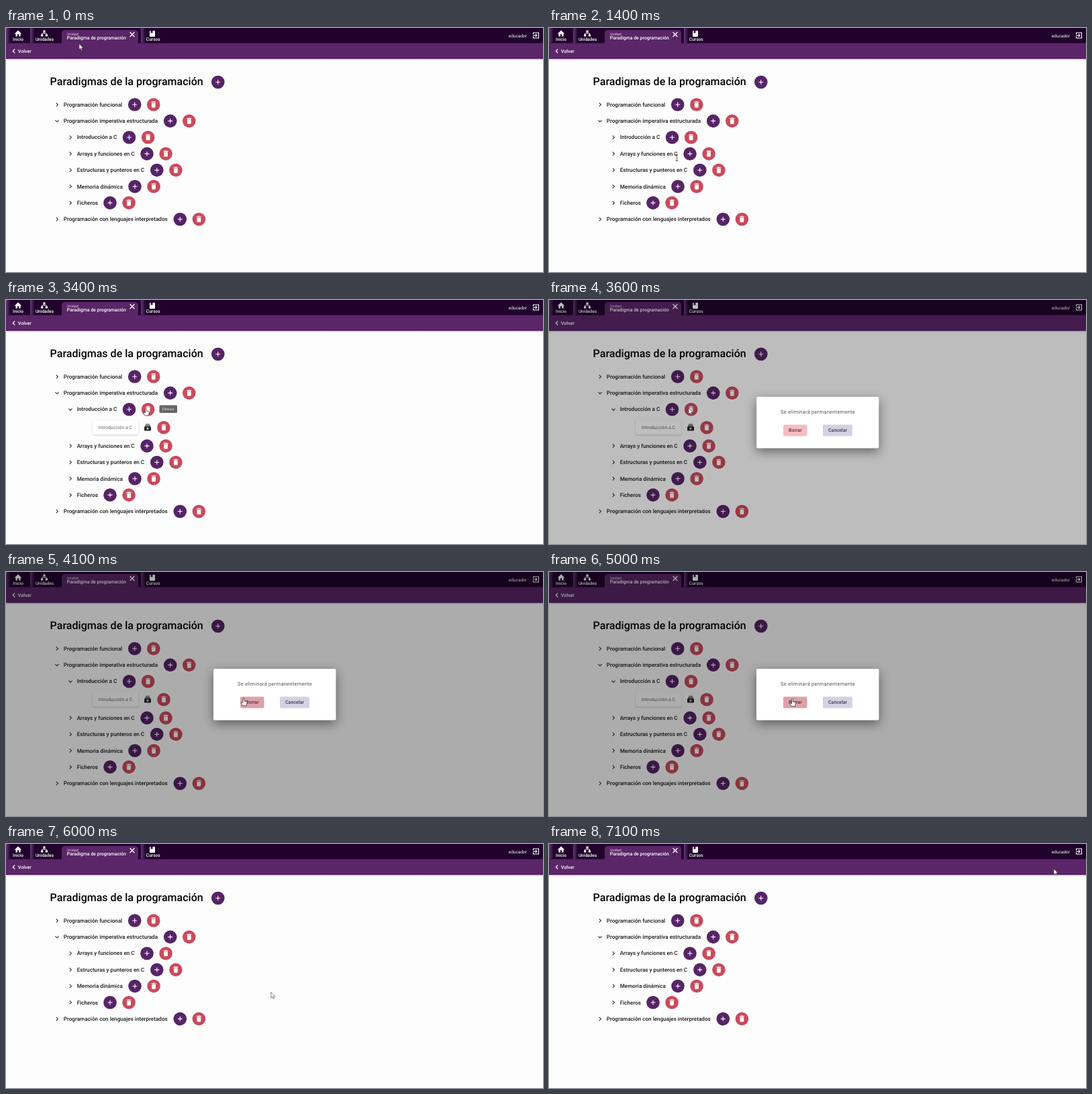
An HTML page that plays this animation: 800x363 px, repeating every 7.6 s.

```html
<!DOCTYPE html>
<html lang="es">
<head>
<meta charset="utf-8">
<title>Unidad</title>
<style>
  html, body { margin: 0; width: 100%; height: 100%; overflow: hidden; background: #fefdfe; }
  svg { display: block; width: 100vw; height: 100vh; font-family: Roboto, sans-serif; }
  text { white-space: pre; text-rendering: geometricPrecision; }
  .medium { font-weight: 500; }
  .line { fill: none; stroke-width: 1.1; }
</style>
</head>
<body>
<svg id="stage" viewBox="0 0 800 363" preserveAspectRatio="none"></svg>
<script>
const LOOP = 7600, STEP = 100;
const PURPLE = '#562467', RED = '#c94b5d', BAR = '#5a2667', DARK = '#20022c';
const PITCH = 24.36, FIRST_ROW = 114, CHILD_HEIGHT = 30;

// label, indent level, x of the add button
const rows = [
  ['Programación funcional', 0, 191.7],
  ['Programación imperativa estructurada', 0, 244.7],
  ['Introducción a C', 1, 183.5],
  ['Arrays y funciones en C', 1, 210],
  ['Estructuras y punteros en C', 1, 224.8],
  ['Memoria dinámica', 1, 192],
  ['Ficheros', 1, 155],
  ['Programación con lenguajes interpretados', 0, 259.3]
];
const PARENT = 1, OPENED = 2;

// time, x, y, pointer shape used from that time on
const pointerKeys = [
  [0, 109, 23.5, 'arrow'],
  [100, 109, 23.5, 'arrow'],
  [800, 352, 215, 'arrow'],
  [1000, 364, 216, 'arrow'],
  [1300, 214, 194, 'ibeam'],
  [1400, 190.5, 193, 'ibeam'],
  [1900, 96, 163, 'hand'],
  [2500, 96, 163, 'ibeam'],
  [2800, 190, 163, 'hand'],
  [3000, 211, 162, 'hand'],
  [3500, 208, 161, 'arrow'],
  [3600, 208, 161, 'arrow'],
  [4000, 354, 188, 'hand'],
  [4900, 354, 188, 'hand'],
  [5100, 371, 190, 'arrow'],
  [5600, 380, 205, 'arrow'],
  [6200, 400, 226, 'arrow'],
  [7000, 752, 37, 'arrow'],
  [LOOP, 752, 36.5, 'arrow']
];

const label = (x, y, size, content, attrs = '') =>
  `<text x="${x}" y="${y}" font-size="${size}" ${attrs}>${content}</text>`;
const box = (x, y, w, h, fill, attrs = '') =>
  `<rect x="${x}" y="${y}" width="${w}" height="${h}" fill="${fill}" ${attrs}/>`;
const at = (x, y, content, attrs = '') =>
  `<g transform="translate(${x} ${y})" ${attrs}>${content}</g>`;

const addButton = (x, y) => at(x, y,
  `<circle r="9.8" fill="${PURPLE}"/><path d="M-3.4 0H3.4M0-3.4V3.4" class="line" stroke="#fff"/>`);
const deleteButton = (x, y) => at(x, y,
  `<circle r="9.8" fill="${RED}"/><path fill="#fff"
    d="M-3.4-4.3h2l.5-.6h1.8l.5.6h2v1.1h-6.8zM-2.9-2.6h5.8v5.9q0 1.1-1.1 1.1h-3.6q-1.1 0-1.1-1.1z"/>`);
const chevron = (x, attrs) =>
  at(x, 0, `<path ${attrs} d="M-1.2-2.6L1.4 0L-1.2 2.6" class="line" stroke="#333"/>`);

function header() {
  const white = 'fill="#fff"', medium = 'class="medium" fill="#fff"';
  const divider = x => box(x, 0, 7, 22.5, 'url(#edge)');
  return box(0, 46, 800, 3, 'url(#shade)')
    + box(0, 0, 800, 23, DARK) + box(0, 22.5, 800, 23.5, BAR)
    + divider(0) + divider(36) + divider(201)
    + `<path d="M83 23V8q0-5 5-5H192q5 0 5 5V23z" fill="${BAR}"/>`
    + at(18, 8, `<path d="M-5.2.4L0-4.4L5.2.4H3.6V4.4H1.1V1.3H-1.1V4.4H-3.6V.4z" ${white}/>`)
    + at(57, 8, `<path d="M-1.6-4.5h3.2v3h-3.2zM-5 1.4h3.2v3H-5zM1.8 1.4H5v3H1.8z" ${white}/>
        <path d="M0-2V0M-3.4 2V0H3.4V2" fill="none" stroke="#fff" stroke-width=".9"/>`)
    + at(218, 8.4, `<rect x="-4" y="-4.5" width="8" height="9" rx="1" ${white}/>
        <path d="M-2.4-4.5h2.8v4l-1.4-1l-1.4 1z" fill="${DARK}"/>`)
    + label(18, 19.2, 6.5, 'Inicio', medium + ' text-anchor="middle"')
    + label(57.5, 19.2, 6.5, 'Unidades', medium + ' text-anchor="middle"')
    + label(219.3, 19.2, 6.6, 'Cursos', medium + ' text-anchor="middle"')
    + label(91, 10.7, 5.4, 'Unidad', 'fill="#e4d8e8"')
    + label(90.8, 17.4, 6.95, 'Paradigma de programación', medium)
    + at(188, 9.6, '<path d="M-3.4-3.4L3.4 3.4M3.4-3.4L-3.4 3.4" fill="none" stroke="#fff" stroke-width="1.4"/>')
    + label(776, 13.6, 6.5, 'educador', white + ' text-anchor="end"')
    + at(789.5, 11, `<path d="M-4-1.6V-4H4V4H-4V1.6M-4.5 0H1.5M-.6-2.1L1.5 0L-.6 2.1" class="line" stroke="#fff"/>`)
    + at(11.8, 34.4, '<path d="M1.5-3L-1.5 0L1.5 3" fill="none" stroke="#fff" stroke-width="1.3"/>')
    + label(17.8, 36.7, 7.1, 'Volver', medium);
}

function childCard() {
  return box(129, -11, 68, 21.5, '#fff', 'rx="2" style="filter:drop-shadow(0 1px 1px #0003)"')
    + label(137.8, 2.3, 6.9, 'Introducción a C', 'fill="#666"')
    + at(211, 0, `<path d="M-3-5.2H3V-4.2H-3zM-4-3.2H4V-2H-4z" fill="#222"/>
        <rect x="-5" y="-1.4" width="10" height="6.2" rx="1" fill="#222"/>
        <path d="M-1.8 1.6H1.8M0-.2V3.4" stroke="#fff" stroke-width=".9"/>`)
    + deleteButton(235, 0);
}

function dialog() {
  return box(309, 144, 182.5, 76.5, '#fff', 'rx="2" style="filter:drop-shadow(0 5px 8px #0007)"')
    + label(400.5, 169.4, 7.5, 'Se eliminará permanentemente',
        'fill="#555" text-anchor="middle" letter-spacing=".25"')
    + box(349, 185.5, 35.5, 17, '#f5bcc3', 'rx="2" id="confirm"')
    + box(408, 185.5, 44, 17, '#d5d1e5', 'rx="2"')
    + label(366.8, 196.4, 7.1, 'Borrar', 'class="medium" fill="#5b3038" text-anchor="middle"')
    + label(430, 196.4, 7.1, 'Cancelar', 'class="medium" fill="#40384f" text-anchor="middle"');
}

const pointers = {
  arrow: `<path d="M0 0V8.6L2 6.8L3.3 9.7L4.6 9.1L3.3 6.3H6z"
    fill="#fff" stroke="#333" stroke-width=".6"/>`,
  ibeam: '<path d="M-1.8-4.5H1.8M0-4.5V4.5M-1.8 4.5H1.8" fill="none" stroke="#333" stroke-width=".8"/>',
  hand: `<path d="M-1 0Q0-1 1 0V4L4 4.6Q5.4 5 5 6.6L4.2 10.8H-1.2L-3.8 7Q-4 5.7-2.6 5.8L-1 7z"
    fill="#fff" stroke="#222" stroke-width=".7"/>`
};

const stage = document.getElementById('stage');
stage.innerHTML = `<defs>
    <linearGradient id="shade" x2="0" y2="1">
      <stop stop-color="#000" stop-opacity=".16"/><stop offset="1" stop-color="#000" stop-opacity="0"/>
    </linearGradient>
    <linearGradient id="edge">
      <stop stop-color="#633878"/><stop offset="1" stop-color="${DARK}"/>
    </linearGradient>
  </defs>`
  + header()
  + label(65.6, 85.2, 16.02, 'Paradigmas de la programación', 'class="medium"')
  + addButton(315.8, 80.5)
  + `<g id="child">${childCard()}</g>`
  + rows.map(([name, level, x], i) => `<g id="row${i}">`
      + chevron(76 + 20 * level, i === OPENED ? 'id="toggle"' : i === PARENT ? 'transform="rotate(90)"' : '')
      + label(85.7 + 20 * level, 2.7, 8.16, name, 'class="medium" fill="#1c1c1c"')
      + addButton(x, 0) + deleteButton(x + 28.1, 0) + '</g>').join('')
  + `<g id="tooltip">${box(228.5, 156.5, 26.5, 11.5, '#666', 'rx="1.5"')}
      ${label(241.7, 164, 4.9, 'Eliminar', 'fill="#eee" text-anchor="middle"')}</g>`
  + box(0, 0, 800, 363, '#000', 'id="scrim"')
  + `<g id="dialog">${dialog()}</g>`
  + Object.entries(pointers).map(([name, art]) => `<g id="${name}">${art}</g>`).join('');

const part = id => document.getElementById(id);
const set = (id, name, value) => part(id).setAttribute(name, value);
const show = (id, visible) => set(id, 'visibility', visible ? 'visible' : 'hidden');
const ramp = (t, start, length) => Math.min(1, Math.max(0, (t - start) / length));
const smooth = p => p * p * (3 - 2 * p);

function drawTree(t) {
  const opening = smooth(ramp(t, 2100, 300));
  const deleted = t >= 5700;
  rows.forEach((row, i) => {
    const shift = i <= OPENED ? 0 : deleted ? -PITCH : CHILD_HEIGHT * opening;
    set('row' + i, 'transform', `translate(0 ${FIRST_ROW + i * PITCH + shift})`);
  });
  show('row' + OPENED, !deleted);
  show('child', opening > 0 && !deleted);
  set('child', 'opacity', opening);
  set('child', 'transform', `translate(0 ${FIRST_ROW + OPENED * PITCH + 27 * opening})`);
  set('toggle', 'transform', `rotate(${90 * opening})`);
}

function drawDialog(t) {
  const entering = ramp(t, 3480, 150), leaving = ramp(t, 5034, 75);
  const scale = 1 - 0.2 * (1 - entering) ** 3;
  show('tooltip', t >= 3000 && t < 3500);
  set('scrim', 'opacity', 0.32 * entering * (1 - leaving));
  set('dialog', 'opacity', t >= 5100 ? 0 : ramp(t, 3480, 75));
  set('dialog', 'transform', `translate(400 182) scale(${scale}) translate(-400 -182)`);
  set('confirm', 'fill', t >= 4000 ? '#dca1aa' : '#f5bcc3');
}

function drawPointer(t) {
  const next = pointerKeys.findIndex(key => key[0] > t);
  const [t0, x0, y0, shape] = pointerKeys[next - 1];
  const [t1, x1, y1] = pointerKeys[next];
  const p = smooth((t - t0) / (t1 - t0));
  for (const name in pointers) show(name, name === shape);
  set(shape, 'transform', `translate(${x0 + (x1 - x0) * p} ${y0 + (y1 - y0) * p})`);
}

function frame() {
  const t = Math.floor(performance.now() % LOOP / STEP) * STEP;
  drawTree(t);
  drawDialog(t);
  drawPointer(t);
  requestAnimationFrame(frame);
}
frame();
</script>
</body>
</html>
```
